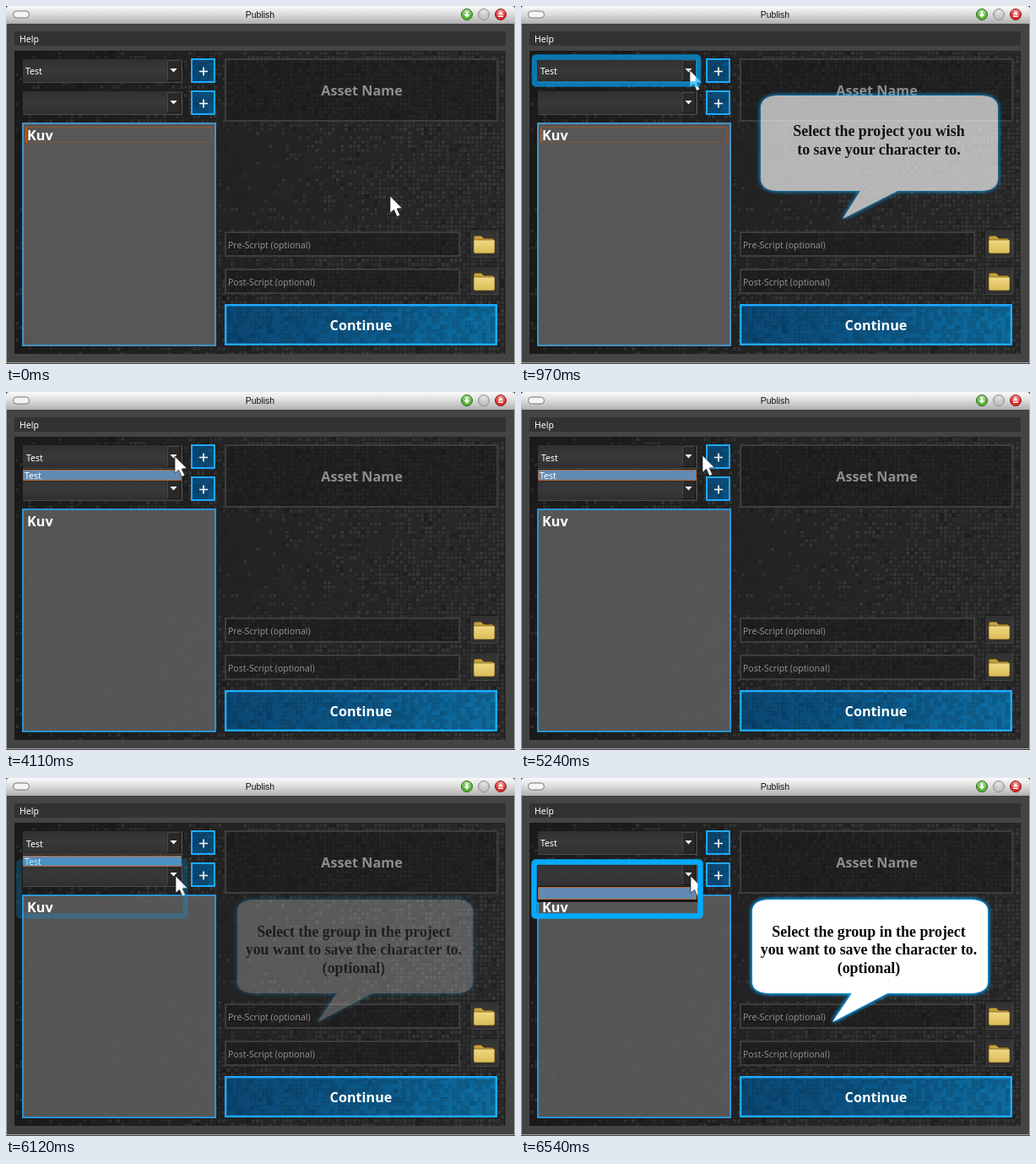
These frames come from a looping animation (603 by 424 pixels, 8000 ms). An HTML page with a canvas:

```html
<!DOCTYPE html>
<html lang="en">
<head>
<meta charset="utf-8">
<title>Publish</title>
<style>
html, body { margin: 0; width: 603px; height: 424px; overflow: hidden; background: #444; }
canvas, svg { position: absolute; left: 0; top: 0; display: block; }
text { font: 10.5px "Noto Sans", sans-serif; fill: #fff; white-space: pre; }
.bold { font-weight: bold; font-size: 16.2px; }
.mid { text-anchor: middle; }
.dim { fill: #8e8e8e; }
.callout text { font: bold 17.9px "Liberation Serif", serif; fill: #0a0a0a; text-anchor: middle; }
.ring { fill: none; stroke: #03a9fb; stroke-width: 6.5; stroke-linejoin: round; }
.bubble { fill: #fff; filter: url(#glow); }
.popup { fill: #628ab2; stroke: #b4683a; }
</style>
</head>
<body>
<canvas id="base" width="603" height="424"></canvas>
<svg width="603" height="424" viewBox="0 0 603 424">
  <defs>
    <filter id="glow" x="-10%" y="-15%" width="120%" height="130%">
      <feDropShadow dx="0" dy="0" stdDeviation="2.8" flood-color="#00a8ff"/>
      <feDropShadow dx="0" dy="0" stdDeviation="1.6" flood-color="#00a8ff"/>
    </filter>
    <linearGradient id="bar" x2="0" y2="1">
      <stop offset="0" stop-color="#fafafa"/><stop offset=".45" stop-color="#dedede"/>
      <stop offset="1" stop-color="#b0b0b0"/>
    </linearGradient>
    <linearGradient id="face" x2="0" y2="1">
      <stop offset="0" stop-color="#303030"/><stop offset=".5" stop-color="#393939"/>
      <stop offset="1" stop-color="#2f2f2f"/>
    </linearGradient>
    <linearGradient id="gold" x2="0" y2="1">
      <stop offset="0" stop-color="#efd983"/><stop offset="1" stop-color="#dcbb58"/>
    </linearGradient>
    <radialGradient id="shine" cy=".2" r=".6">
      <stop offset="0" stop-color="#fff" stop-opacity=".6"/><stop offset="1" stop-color="#fff" stop-opacity="0"/>
    </radialGradient>
    <g id="combo">
      <rect x=".5" y=".5" width="189" height="28" fill="url(#face)" stroke="#1c1c1c"/>
      <path d="M1 28.5H189.5V1" fill="none" stroke="#4b4b4b"/>
      <rect x="172.5" y="2.5" width="15" height="24" fill="#292929" stroke="#191919"/>
      <path d="M172.5 26V2.5H187" fill="none" stroke="#474747"/>
      <path d="M175.5 12h8l-4 4.5z" fill="#fff"/>
    </g>
    <g id="plus">
      <rect x="1" y="1" width="27" height="27" fill="none" stroke="#1eaaff" stroke-width="2"/>
      <path d="M10 15.5H20M15 10.5V20.5" stroke="#fff" stroke-width="1.6"/>
    </g>
    <g id="folder">
      <rect x=".5" y=".5" width="33" height="33" rx="1" fill="url(#face)" stroke="#1b1b1b"/>
      <path d="M1 33.5H33.5V1" fill="none" stroke="#464646"/>
      <path d="M5 27V10q0-2 2-2h7l3 3h10q2 0 2 2v14z" fill="#c79f3c" stroke="#33280d" stroke-width=".8"/>
      <path d="M5 13H30v14q0 2-2 2H7q-2 0-2-2z" fill="url(#gold)" stroke="#5b4713" stroke-width=".6"/>
    </g>
  </defs>

  <!-- title bar -->
  <path d="M0 21V4q0-4 4-4H599q4 0 4 4V21z" fill="url(#bar)"/>
  <rect x="8.5" y="6" width="19" height="8" rx="4" fill="#f4f4f4" stroke="#777"/>
  <text x="301" y="14" class="mid" style="font:10.5px 'Liberation Sans',sans-serif;fill:#111">Publish</text>
  <circle cx="546" cy="10" r="6.5" fill="#55b52f" stroke="#2c671d"/>
  <circle cx="566" cy="10" r="6.5" fill="#c3c3c3" stroke="#8c8c8c"/>
  <circle cx="586" cy="10" r="6.5" fill="#dd2a28" stroke="#8c2220"/>
  <circle cx="546" cy="10" r="6" fill="url(#shine)"/>
  <circle cx="566" cy="10" r="6" fill="url(#shine)"/>
  <circle cx="586" cy="10" r="6" fill="url(#shine)"/>
  <path d="M544.8 6.5h2.4v3.5h2.3l-3.5 3.7-3.5-3.7h2.3z" fill="#fff"/>
  <path d="M586 6.5l3.3 3.7h-6.6zM583 11.5h6v1.6h-6z" fill="#fff"/>
  <text x="16" y="43">Help</text>

  <!-- form -->
  <use href="#combo" x="19" y="62"/>
  <use href="#combo" x="19" y="100"/>
  <use href="#plus" x="219" y="62"/>
  <use href="#plus" x="219" y="100"/>
  <text id="project" y="81">Test</text>
  <g fill="none" stroke="#3d3d3d" stroke-width="2">
    <rect x="260" y="63" width="322" height="73"/>
    <rect x="260" y="268" width="277" height="28"/>
    <rect x="260" y="312" width="277" height="28"/>
  </g>
  <text x="421.5" y="106" class="bold mid dim">Asset Name</text>
  <text x="263" y="287" class="dim">Pre-Script (optional)</text>
  <text x="263" y="331" class="dim">Post-Script (optional)</text>
  <use href="#folder" x="549" y="264"/>
  <use href="#folder" x="549" y="308"/>
  <rect x="260.2" y="354.2" width="320.6" height="46.6" fill="none" stroke="#1eaaff" stroke-width="2.4"/>
  <text x="420.5" y="384" class="bold mid">Continue</text>

  <rect x="20" y="139" width="228" height="263" fill="none" stroke="#2a94d4" stroke-width="2"/>
  <g id="focus">
    <rect x="20" y="139" width="228" height="263" fill="#575757" stroke="#4792c2" stroke-width="2"/>
    <rect x="23.5" y="143.5" width="220" height="18" fill="none" stroke="#c4500f" stroke-dasharray="1 1"/>
    <rect x="23" y="144" width="2" height="17" fill="#c4500f"/>
  </g>
  <text x="25" y="159" class="bold">Kuv</text>

  <g id="projects">
    <rect x="20.5" y="92.5" width="187" height="12" class="popup"/>
    <text x="22" y="103">Test</text>
  </g>
  <g id="groups">
    <rect x="19" y="128" width="190" height="19" fill="#161616"/>
    <rect x="20.5" y="129.5" width="187" height="14" class="popup"/>
  </g>

  <path id="cursor" d="M0 0V20.3L4.5 16.3 8.2 24.4 11.8 22.8 8.2 15 14.3 14.6z" fill="#fff" stroke="#222" stroke-width=".7"/>

  <g id="pickProject" class="callout">
    <rect x="16" y="60.5" width="194" height="32" rx="2" class="ring"/>
    <path class="bubble" d="M304 106H545Q565 107 565 121V204Q565 218 545 219H446L381 252 402 219H304Q284 218 284 204V121Q284 107 304 106z"/>
    <text x="424" y="154">Select the project you wish</text>
    <text x="424" y="176">to save your character to.</text>
  </g>
  <g id="pickGroup" class="callout">
    <rect x="15.5" y="99.5" width="197" height="64" rx="2" class="ring"/>
    <path class="bubble" d="M294 144H533Q553 145 553 158V241Q553 254 533 255H434L369 289 392 255H294Q274 254 274 241V158Q274 145 294 144z"/>
    <text x="412" y="187.5">Select the group in the project</text>
    <text x="412" y="209">you want to save the character to.</text>
    <text x="412" y="230.5">(optional)</text>
  </g>
</svg>

<script>
const $ = id => document.getElementById(id);
const ctx = $('base').getContext('2d');

let seed = 7;
const rnd = () => (seed = (seed * 16807) % 2147483647) / 2147483647;

function fill(x, y, w, h, ...stops) {
  const g = ctx.createLinearGradient(x, 0, x + w, 0);
  stops.forEach((c, i) => g.addColorStop(stops.length > 1 ? i / (stops.length - 1) : 0, c));
  ctx.fillStyle = g;
  ctx.fillRect(x, y, w, h);
}

// Small tiles with dark gaps, more of them where density is high.
function mosaic(x0, y0, w, h, light, density) {
  ctx.save();
  ctx.beginPath();
  ctx.rect(x0, y0, w, h);
  ctx.clip();
  for (let y = y0; y < y0 + h; y += 15)
    for (let x = x0; x < x0 + w; x += 15) {
      const d = density(x, y) * (0.7 + rnd() * 0.5);
      ctx.fillStyle = `rgba(0,0,0,${rnd() * 0.06})`;
      ctx.fillRect(x, y, 15, 15);
      for (let i = 0; i < 9; i++) {
        const tx = x + i % 3 * 5, ty = y + Math.floor(i / 3) * 5;
        if (rnd() > d) continue;
        ctx.fillStyle = 'rgba(0,0,0,.17)';
        ctx.fillRect(tx, ty, 5, 5);
        if (rnd() < 0.08) continue;
        ctx.fillStyle = `rgba(${light},${0.05 + rnd() * 0.05})`;
        ctx.fillRect(tx + 1, ty + 1, 4, 4);
      }
    }
  ctx.restore();
}

function panelDensity(x, y) {
  const calm = y > 135 && y < 262;
  return calm ? 0.05 + 0.75 * Math.max(0, (x - 270) / 320) : 0.2 + 0.65 * x / 603;
}

function drawBase() {
  fill(0, 0, 603, 424, '#444444');
  fill(10, 30, 582, 17, '#323232');
  fill(10, 53, 582, 359, '#1b1b1b', '#252525', '#292929');
  mosaic(10, 53, 582, 359, '255,255,255', panelDensity);
  fill(259, 62, 324, 75, 'rgba(24,24,24,.5)');
  for (const y of [267, 311]) fill(259, y, 279, 30, 'rgba(24,24,24,.5)');
  fill(19, 138, 230, 265, 'rgba(94,94,94,.87)');
  for (const y of [62, 100]) {
    fill(219, y, 29, 29, '#0b4673', '#0b527f');
    mosaic(219, y, 29, 29, '60,170,240', () => 0.4);
  }
  fill(259, 353, 323, 49, '#0a4876', '#0b5a8d', '#0d71a6');
  mosaic(259, 353, 323, 49, '70,180,250', () => 0.6);
  ctx.strokeStyle = '#a4a4a4';
  ctx.strokeRect(0.5, 20.5, 602, 402);
}

const LOOP = 8000;
const cursorSteps = [
  [0, 455, 225], [150, 390, 193], [300, 281, 125], [450, 251, 106], [600, 226, 92],
  [720, 210, 81], [840, 200, 76], [5090, 207, 77], [5240, 215, 75], [5370, 224, 74],
  [5510, 228, 74], [5660, 222, 92], [5810, 215, 104], [5960, 207, 110], [6120, 201, 116]
];
const projectFade = [[0, 0], [840, 0.33], [970, 0.67], [1110, 1], [4110, 0]];
const groupFade = [[0, 0], [6120, 0.25], [6260, 0.5], [6540, 1]];

const at = (steps, t) => steps.findLast(s => s[0] <= t).slice(1);
const show = (id, on) => $(id).setAttribute('opacity', Number(on));

function draw(now) {
  const t = now % LOOP;
  const listOpen = t >= 4110 && t < 6540;
  const [x, y] = at(cursorSteps, t);
  $('cursor').setAttribute('transform', `translate(${x} ${y})`);
  $('project').setAttribute('x', listOpen ? 24 : 23);
  $('project').setAttribute('y', listOpen ? 82 : 81);
  show('focus', t < 4110);
  show('projects', listOpen);
  show('groups', t >= 6540);
  show('pickProject', at(projectFade, t)[0]);
  show('pickGroup', at(groupFade, t)[0]);
}

drawBase();
const start = performance.now();
function tick() {
  draw(performance.now() - start);
  requestAnimationFrame(tick);
}
tick();
</script>
</body>
</html>
```
